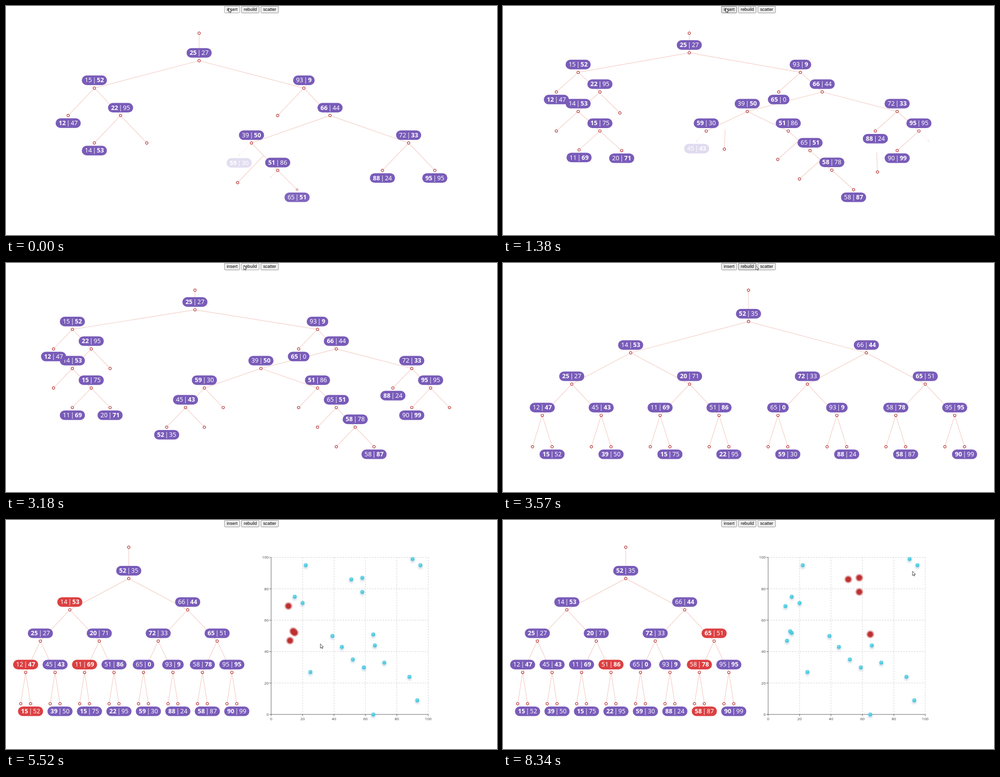
Write an HTML page that moves like this. It is 1000x469 px and loops after 8370 ms.

```html
<!DOCTYPE html>
<html lang="en">
<head>
<meta charset="utf-8">
<title>K-d tree</title>
<style>
  html, body { margin: 0; width: 100%; height: 100%; overflow: hidden; background: #fff; }
  svg { display: block; }
  #stage { width: 100%; height: 100%; }
  .pill { font: 12.6px "Noto Sans", "Open Sans", sans-serif; fill: #fff; }
  .ui { font: 8.9px "Liberation Sans", Arial, sans-serif; text-anchor: middle; }
  .tick { font: 7.9px "Open Sans", "Noto Sans", sans-serif; fill: #444; }
  .edge { stroke: #f4cfc7; stroke-width: 1.2; }
  .ring { fill: #fff; stroke: #b73636; stroke-width: 1.2; }
  #dots { filter: drop-shadow(0 3px 2px rgba(25, 100, 150, .3)); }
</style>
</head>
<body>
<svg id="stage" viewBox="0 0 1000 469">
  <defs>
    <radialGradient id="cyan" cx=".4" cy=".3" r="1">
      <stop offset="0" stop-color="#7adceb"/>
      <stop offset="1" stop-color="#24b6d2"/>
    </radialGradient>
  </defs>
  <g id="buttons"></g>
  <svg id="tree" width="1000" height="469" overflow="hidden"></svg>
  <g id="chart">
    <g id="grid"></g>
    <g id="hot"></g>
    <g id="dots"></g>
  </g>
  <path id="cursor" d="M0 0V8.8L2 6.9L3.3 9.9L4.6 9.3L3.4 6.4H6.2Z" fill="#fff" stroke="#222" stroke-width=".8"/>
</svg>
<script>
const LOOP = 8370, MOVE = 300, FADE = 400, REBUILD = 3200, SCATTER = 4543;
const $ = id => document.getElementById(id);
const mix = (a, b, k) => a + (b - a) * k;
const clamp = v => Math.max(0, Math.min(1, v));
const ease = v => (v = clamp(v)) < .5 ? 4 * v ** 3 : 1 - 4 * (1 - v) ** 3;
const last = (list, t) => list.filter(e => e.t <= t).pop();

const parse = s => s.split(' ').map(key => ({ key, p: key.split('|').map(Number) }));
const base = parse('25|27 15|52 93|9 12|47 22|95 66|44 14|53 39|50 72|33 51|86 88|24 95|95');
const added = parse('65|51 59|30 15|75 58|78 65|0 20|71 58|87 90|99 11|69 45|43 52|35');
const points = [...base, ...added];
const inserts = [-297, -146, 7, 160, 313, 466, 620, 790, 1010, 1230, 1450];

// --- k-d trees ---
function insertAll(list) {
  let root = null;
  const put = (node, item, d) => {
    if (!node) return { ...item };
    const side = item.p[d % 2] < node.p[d % 2] ? 'l' : 'r';
    node[side] = put(node[side], item, d + 1);
    return node;
  };
  for (const item of list) root = put(root, item, 0);
  return root;
}

function balance(list, d = 0) {
  if (!list.length) return null;
  const s = [...list].sort((a, b) => a.p[d % 2] - b.p[d % 2]);
  const m = (s.length - 1) >> 1;
  return { ...s[m], l: balance(s.slice(0, m), d + 1), r: balance(s.slice(m + 1), d + 1) };
}

// --- tidy layout: siblings 1 apart, cousins 2 apart ---
function fit(n) {
  const [a, b] = n.kids.map(fit);
  if (!a) return { lo: [0], hi: [0] };
  if (!b) { n.kids[0].dx = 0; return { lo: [0, ...a.lo], hi: [0, ...a.hi] }; }
  let gap = 1;
  for (let i = 0; i < Math.min(a.hi.length, b.lo.length); i++)
    gap = Math.max(gap, a.hi[i] - b.lo[i] + (i ? 2 : 1));
  const h = gap / 2, lo = [0], hi = [0];
  n.kids[0].dx = -h;
  n.kids[1].dx = h;
  for (let i = 0; i < Math.max(a.lo.length, b.lo.length); i++) {
    lo.push(i < a.lo.length ? a.lo[i] - h : b.lo[i] + h);
    hi.push(i < b.hi.length ? b.hi[i] + h : a.hi[i] - h);
  }
  return { lo, hi };
}

function layout(tree, left, width) {
  let blanks = 0;
  const wrap = n => {
    if (!n) return { key: '#' + blanks++, kids: [] };
    const kids = n.l || n.r ? [wrap(n.l), wrap(n.r)] : [];
    return { key: n.key, p: n.p, kids };
  };
  const top = { key: 'top', kids: [wrap(tree)] };
  const { lo, hi } = fit(top);
  const min = Math.min(...lo), unit = width / (Math.max(...hi) - min + 2);
  const out = {};
  const walk = (n, x, depth, parent) => {
    const pos = {
      key: n.key, p: n.p, parent, bold: (depth + 1) % 2, leaf: !n.kids.length,
      x: left + (x - min + 1) * unit, y: 55.8 + depth * 320.4 / (lo.length - 1)
    };
    out[n.key] = pos;
    n.kids.forEach(k => walk(k, x + k.dx, depth + 1, n.key));
  };
  walk(top, 0, 0, null);
  return out;
}

// --- transitions: values are [x, y, edge x, edge y, scale] ---
const pose = (item, start, t) => {
  const k = ease((t - start) / MOVE);
  return item.a.map((v, i) => mix(v, item.b[i], k));
};

function advance(prev, t, goal) {
  const items = {};
  const now = key => {
    const it = prev && prev.items[key];
    return it && !it.dead ? pose(it, prev.t, t) : null;
  };
  for (const g of Object.values(goal)) {
    const up = goal[g.parent] || g, old = now(g.key);
    const b = [g.x, g.y, up.x, up.y, 1];
    let a = old;
    if (!a) {
      const src = now(g.parent) || [up.x, up.y];
      a = prev ? [src[0], src[1], src[0], src[1], 0] : b;
    }
    items[g.key] = { ...g, a, b, born: old ? prev.items[g.key].born : prev ? t : -1e5 };
  }
  if (prev) for (const it of Object.values(prev.items)) {
    if (it.dead || items[it.key]) continue;
    const q = goal[it.parent];
    items[it.key] = { ...it, a: pose(it, prev.t, t), b: [q.x, q.y, q.x, q.y, 0], dead: true };
  }
  return { t, items };
}

const scenes = [advance(null, -9999, layout(insertAll(base), 20, 960))];
const then = (t, tree, left = 20, width = 960) =>
  scenes.push(advance(scenes[scenes.length - 1], t, layout(tree, left, width)));
inserts.forEach((t, i) => then(t, insertAll(points.slice(0, base.length + i + 1))));
then(REBUILD, balance(points));
then(SCATTER, balance(points), 10, 480);

// --- nearest neighbours under the pointer ---
const nearest = key => {
  const [x, y] = points.find(q => q.key === key).p;
  const far = q => Math.hypot(q.p[0] - x, q.p[1] - y);
  return [...points].sort((a, b) => far(a) - far(b)).slice(0, 4).map(q => q.key);
};
const hovers = [[5300, '12|47'], [5610, '45|43'], [5980, '65|0'], [6360, '39|50'], [6770, '65|51'], [7640, '58|78']]
  .map(([t, key]) => ({ t, keys: nearest(key) }));

const path = [
  [0, 453.5, 4], [1600, 453.5, 4], [2300, 484, 5], [3300, 484, 5], [3570, 515, 5.5],
  [4000, 540, 3], [4850, 540, 3], [5080, 548, 60], [5290, 577, 246], [5420, 577, 246],
  [5600, 684, 259], [5850, 760, 375], [5980, 748, 397], [6130, 748, 397], [6360, 664, 236],
  [6450, 664, 236], [6720, 744.5, 240], [6780, 747, 235], [7300, 747, 235], [7640, 725, 147],
  [7850, 725, 147], [8320, 834, 105], [LOOP, 834, 105]
];
function pointer(t) {
  const i = path.findIndex(p => p[0] > t), a = path[i - 1], b = path[i];
  let k = (t - a[0]) / (b[0] - a[0]);
  k = k * k * (3 - 2 * k);
  return [mix(a[1], b[1], k), mix(a[2], b[2], k)];
}

// --- drawing ---
const buttons = [
  { name: 'insert', x: 445, w: 31, clicks: inserts },
  { name: 'rebuild', x: 479.5, w: 36, clicks: [REBUILD] },
  { name: 'scatter', x: 519, w: 36, clicks: [SCATTER] }
];
function drawButtons(t, [x, y]) {
  $('buttons').innerHTML = buttons.map(b => {
    const over = y < 14.5 && x >= b.x && x <= b.x + b.w;
    const down = over && b.clicks.some(c => c > t && c - t < 60);
    const [fill, line] = down ? ['#f5f5f5', '#8d8d8d'] : over ? ['#e5e5e5', '#4f4f4f'] : ['#efefef', '#767676'];
    return `<rect x="${b.x}" y=".4" width="${b.w}" height="13.8" rx="1.6" fill="${fill}" stroke="${line}" stroke-width=".8"/>` +
      `<text class="ui" x="${b.x + b.w / 2}" y="10.3">${b.name}</text>`;
  }).join('');
}

function pill(n, x, y, hot, alpha) {
  const [a, b] = n.key.split('|'), digit = 7.2;
  const w = digit * (a.length + b.length) + 22.4;
  const bar = x - w / 2 + 6.2 + digit * a.length + 5;
  const num = (s, px, anchor, bold) =>
    `<text class="pill" x="${px}" y="${y + 4.3}" text-anchor="${anchor}" font-weight="400" style="font-weight:${bold ? 700 : 400}">${s}</text>`;
  return `<g opacity="${alpha}"><rect x="${x - w / 2}" y="${y - 9.8}" width="${w}" height="19.6" rx="9.8" fill="${hot ? '#dc4042' : '#795cb9'}"/>` +
    num(a, bar - 5, 'end', !n.bold) + num('|', bar, 'middle', false) + num(b, bar + 5, 'start', n.bold) + '</g>';
}

function drawTree(t, hot) {
  const scene = last(scenes, t);
  let edges = '', inner = '', leaves = '', rings = '';
  for (const n of Object.values(scene.items)) {
    const [x, y, px, py, s] = pose(n, scene.t, t);
    const alpha = n.dead ? 1 - ease((t - scene.t) / MOVE) : ease((t - n.born) / FADE);
    if (alpha < .005) continue;
    if (n.parent) edges += `<line class="edge" x1="${px}" y1="${py}" x2="${x}" y2="${y}" opacity="${alpha}"/>`;
    rings += `<circle class="ring" r="2.6" transform="translate(${x} ${y}) scale(${s})" opacity="${alpha}"/>`;
    if (!n.p) continue;
    const label = pill(n, x, y + (n.leaf ? 15.6 : -16), hot.includes(n.key), alpha);
    if (n.leaf) leaves += label; else inner += label;
  }
  $('tree').setAttribute('width', t < SCATTER ? 1000 : 500);
  $('tree').innerHTML = edges + inner + rings + leaves;
}

const sx = v => 540 + 3.2 * v, sy = v => 398.2 - 3.217 * v;
function drawGrid() {
  const line = (x1, y1, x2, y2, style) => `<line x1="${x1}" y1="${y1}" x2="${x2}" y2="${y2}" ${style}/>`;
  const dash = 'stroke="#ccc" stroke-width=".9" stroke-dasharray="3 2.4"', solid = 'stroke="#555" stroke-width=".9"';
  let s = '';
  for (let v = 0; v <= 100; v += 20) {
    const x = sx(v), y = sy(v);
    if (v) s += line(x, sy(0), x, sy(100), dash) + line(sx(0), y, sx(100), y, dash);
    s += line(x, sy(0), x, sy(0) + 3.5, solid) + line(sx(0) - 3.5, y, sx(0), y, solid);
    s += `<text class="tick" x="${x}" y="409.8" text-anchor="middle">${v}</text>`;
    s += `<text class="tick" x="535" y="${y + 2.8}" text-anchor="end">${v}</text>`;
  }
  $('grid').innerHTML = s + line(sx(0), sy(0), sx(100), sy(0), solid) + line(sx(0), sy(0), sx(0), sy(100), solid);
}

let shown;
function drawDots(hot) {
  if (shown === hot) return;
  shown = hot;
  const disc = (q, r, fill, alpha = 1) =>
    `<circle cx="${sx(q.p[0])}" cy="${sy(q.p[1])}" r="${r}" fill="${fill}" opacity="${alpha}"/>`;
  const red = '#bd3030';
  $('hot').innerHTML = points.filter(q => hot.includes(q.key))
    .map(q => disc(q, 8.3, red, .28) + disc(q, 6.9, red, .4) + disc(q, 5.3, red)).join('');
  $('dots').innerHTML = points.filter(q => !hot.includes(q.key)).map(q => disc(q, 4, 'url(#cyan)')).join('');
}

const none = [];
function frame() {
  const t = performance.now() % LOOP, at = pointer(t);
  const hover = last(hovers, t), hot = hover ? hover.keys : none;
  drawButtons(t, at);
  drawTree(t, hot);
  drawDots(hot);
  $('chart').style.display = t < SCATTER ? 'none' : '';
  $('cursor').setAttribute('transform', `translate(${at})`);
  requestAnimationFrame(frame);
}
drawGrid();
frame();
</script>
</body>
</html>
```
